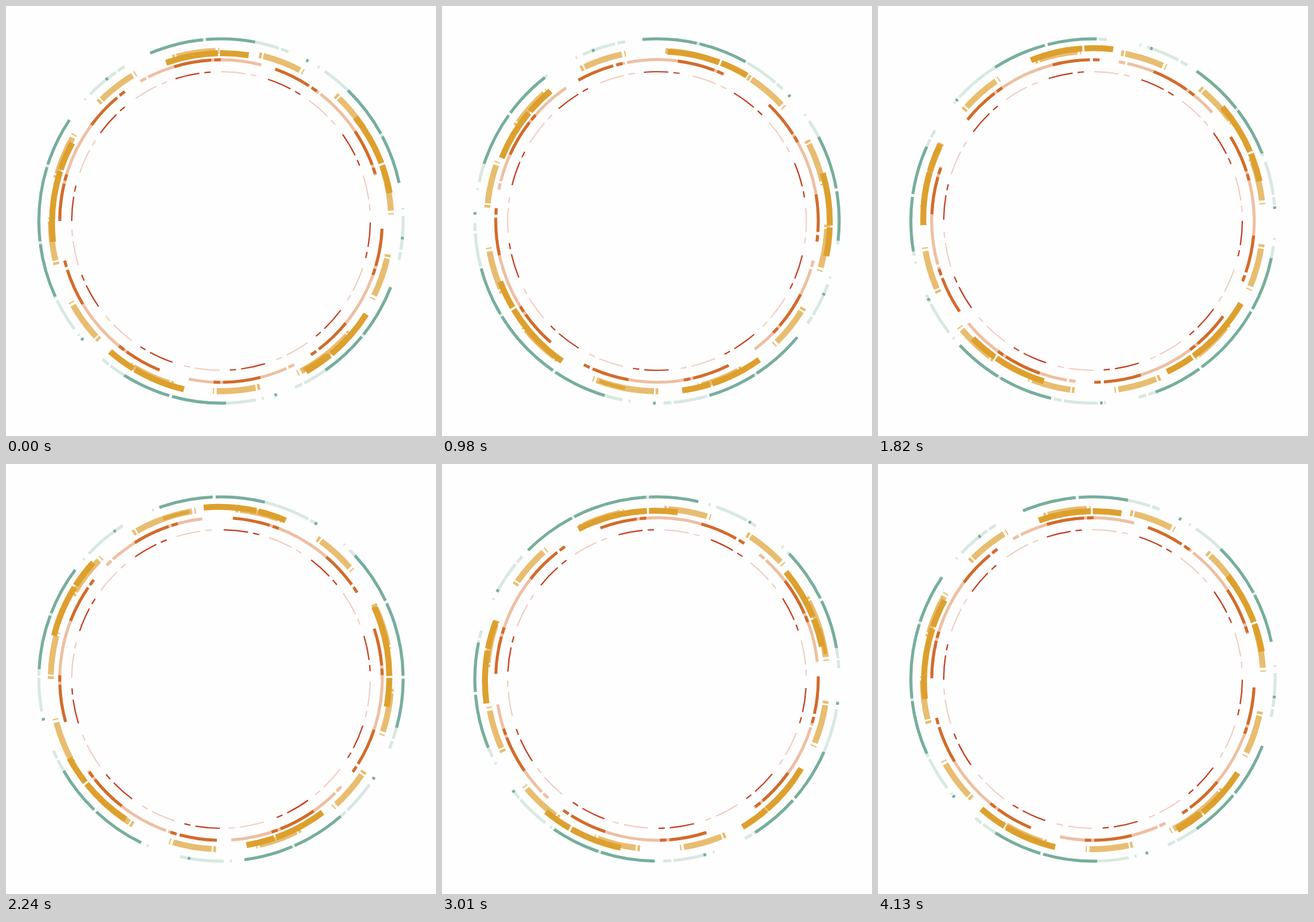
An HTML page for the animation above (4200 ms loop, 720 by 720 pixels).

```html
<!DOCTYPE html>
<html lang="en">
<head>
<meta charset="utf-8">
<title>Dashed rings</title>
<style>
  html, body { margin: 0; width: 100%; height: 100%; overflow: hidden; background: #fefefe; }
  svg { display: block; width: 100vw; height: 100vh; }
  circle { fill: none; }
</style>
</head>
<body>
<svg id="stage" viewBox="0 0 720 720"></svg>
<script>
const LOOP = 4200, STEP = 70, MID = 360;
const NS = "http://www.w3.org/2000/svg";
const stage = document.getElementById("stage");

// r: radius, w: line width, from: start angle, dir: 1 clockwise or -1,
// dash: lengths in degrees, off: shift of the ring's own centre
const rings = [
  { r: 305, w: 5, color: "#d8e8e2", from: 89.8, dir: 1, dash: [10.7, 0.7, 2.5, 10.4, 0.6, 1.96] },
  { r: 305, w: 5, color: "#76ae9d", from: 180, dir: -1, dash: [17.2, 0.9, 15.6, 17.1, 0.8, 15.5] },
  { r: 285, w: 10, color: "#e8bd70", from: 48.8, dir: 1, dash: [13.2, 0.9, 0.4, 13.5, 0.9, 0.55] },
  { r: 285, w: 6, color: "#dfa438", from: 52, dir: 1, dash: [9, 351] },
  { r: 285, w: 10, color: "#dda02e", from: 180, dir: -1, dash: [17.8, 0.7, 9.7, 42.55], off: [2, 4] },
  { r: 270, w: 5, color: "#eebfa2", from: 249.1, dir: -1, dash: [35.4, 20.5, 2.3, 0.8] },
  { r: 270, w: 5, color: "#d36b2a", from: 180, dir: -1, dash: [13.4, 1.1, 2.3, 19.75] },
  { r: 250, w: 2, color: "#efcbc1", from: 270, dir: 1, dash: [9.4, 1.95, 2.4, 22.37] },
  { r: 250, w: 2.2, color: "#c43d20", from: 180, dir: 1, dash: [9.4, 1.95, 2.4, 22.37] }
];

function add(parent, tag, attrs) {
  const node = document.createElementNS(NS, tag);
  for (const key in attrs) node.setAttribute(key, attrs[key]);
  return parent.appendChild(node);
}

for (const ring of rings) {
  const [dx, dy] = ring.off || [0, 0];
  const cx = MID + dx, cy = MID + dy;
  ring.group = add(stage, "g", {});
  add(ring.group, "circle", {
    cx, cy, r: ring.r, pathLength: 360,
    stroke: ring.color, "stroke-width": ring.w,
    "stroke-dasharray": ring.dash.join(" "),
    transform: `rotate(${ring.from} ${cx} ${cy})`
  });
}

// one full turn, slow at both ends
function ease(x) {
  const smooth = x * x * (3 - 2 * x);
  const sine = (1 - Math.cos(Math.PI * x)) / 2;
  return 0.75 * smooth + 0.25 * sine;
}

function draw(time) {
  const t = Math.floor((time % LOOP) / STEP) * STEP;
  const angle = 360 * ease(t / LOOP);
  for (const { group, dir } of rings) {
    group.setAttribute("transform", `rotate(${dir * angle} ${MID} ${MID})`);
  }
}

const start = performance.now();
function tick(now) {
  draw(Math.max(0, now - start));
  requestAnimationFrame(tick);
}
draw(0);
requestAnimationFrame(tick);
</script>
</body>
</html>
```
